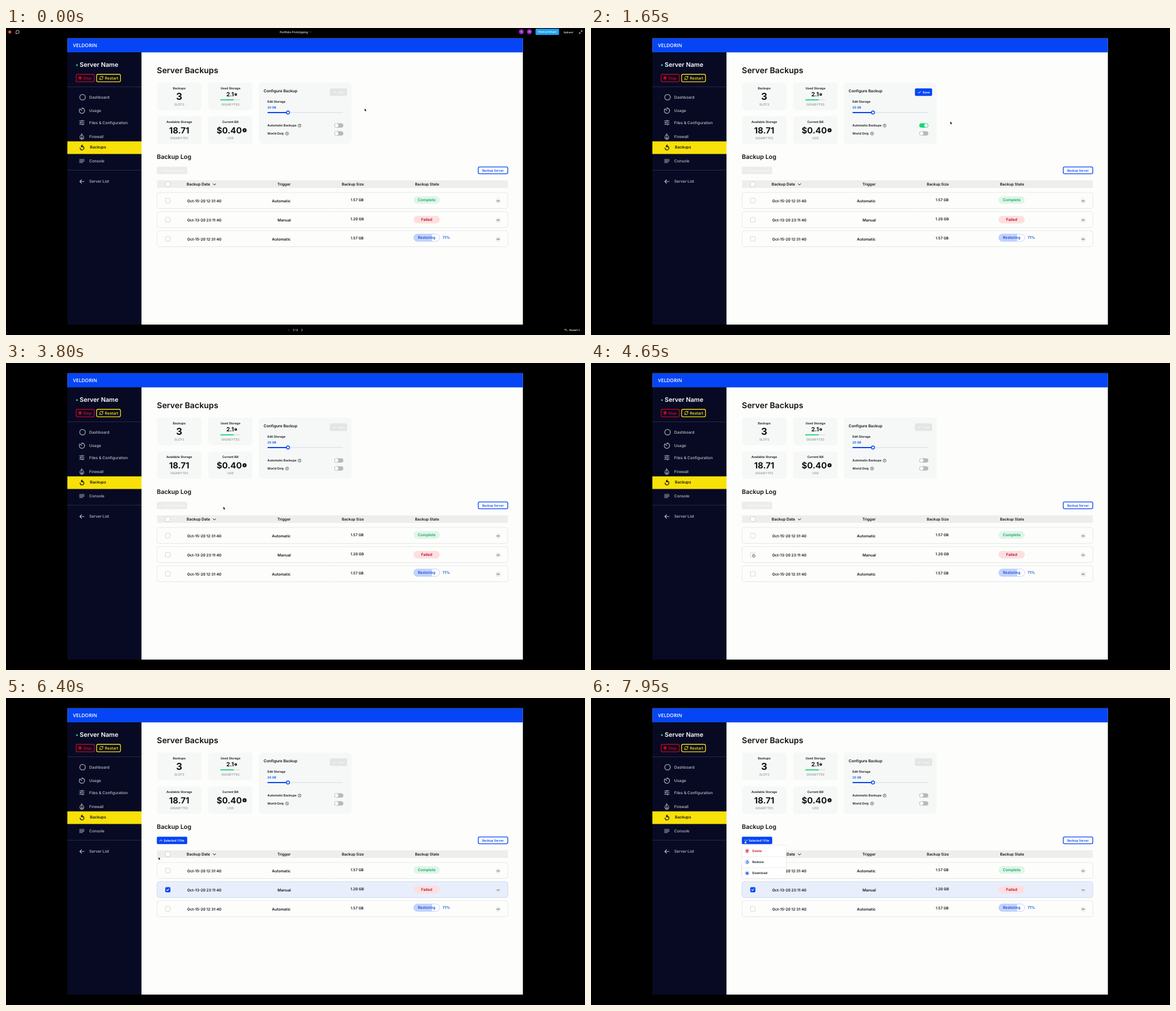
An HTML page with a canvas that plays this animation: 1000x530 px, repeating every 8 s.

```html
<!DOCTYPE html>
<html lang="en">
<head>
<meta charset="utf-8">
<title>Server Backups</title>
<style>
  html, body { margin: 0; width: 100%; height: 100%; overflow: hidden; background: #000; }
  canvas { display: block; width: 1000px; height: 530px; }
</style>
</head>
<body>
<canvas id="stage"></canvas>
<script>
const LOOP = 8000;
const BLUE = '#0545f5', NAVY = '#070a22', YELLOW = '#f8e108', RED = '#cf0a24',
      GREEN = '#1bd475', INK = '#111214', PAGE = '#fdfefc', CARD = '#f5f8f6', GREY = '#9da09e';

const canvas = document.getElementById('stage');
const ctx = canvas.getContext('2d');
const ratio = window.devicePixelRatio || 1;
canvas.width = 1000 * ratio;
canvas.height = 530 * ratio;

// Click times and the pointer route: [ms, x, y]
const TOGGLE_ON = 700, TOGGLE_OFF = 3150, SELECT = 4750, OPEN_MENU = 7300;
const route = [
  [0, 619.5, 139], [100, 619.5, 139], [550, 578.5, 167], [1300, 578.5, 167],
  [1800, 632, 160], [2500, 632, 160], [2950, 578, 167], [3300, 578, 167],
  [3800, 375.5, 248.3], [4500, 280.5, 330.5], [5500, 280.5, 330.5],
  [6400, 263.5, 274.7], [6900, 266, 246.8], [LOOP, 266, 246.8]
];

function text(str, x, y, size, { color = INK, weight = 600, align = 'left', family = 'Inter' } = {}) {
  ctx.font = `${weight} ${size}px ${family}, sans-serif`;
  ctx.textAlign = align;
  ctx.fillStyle = color;
  ctx.fillText(str, x, y);
}

const centered = (str, x, y, size, color = INK, weight = 600) =>
  text(str, x, y, size, { color, weight, align: 'center' });

function rect(x, y, w, h, color) {
  ctx.fillStyle = color;
  ctx.fillRect(x, y, w, h);
}

function box(x, y, w, h, r, fill, stroke, width = 1) {
  ctx.beginPath();
  ctx.roundRect(x, y, w, h, r);
  if (fill) { ctx.fillStyle = fill; ctx.fill(); }
  if (stroke) { ctx.strokeStyle = stroke; ctx.lineWidth = width; ctx.stroke(); }
}

function circle(x, y, r, fill, stroke, width = 1) {
  ctx.beginPath();
  ctx.arc(x, y, r, 0, Math.PI * 2);
  if (fill) { ctx.fillStyle = fill; ctx.fill(); }
  if (stroke) { ctx.strokeStyle = stroke; ctx.lineWidth = width; ctx.stroke(); }
}

function icon(d, x, y, stroke, width = 1, fill) {
  const path = new Path2D(d);
  ctx.save();
  ctx.translate(x, y);
  ctx.lineCap = ctx.lineJoin = 'round';
  if (fill) { ctx.fillStyle = fill; ctx.fill(path); }
  if (stroke) { ctx.strokeStyle = stroke; ctx.lineWidth = width; ctx.stroke(path); }
  ctx.restore();
}

const SHAPES = {
  check: 'M-2 0L-.6 1.5L2-1.5',
  down: 'M-2.3-1.1L0 1.1L2.3-1.1',
  up: 'M-2.1 1L0-1L2.1 1',
  gauge: 'M-3.2-3.2A4.6 4.6 0 1 0 0-4.6V-3M0 0L-2.7-2.6',
  sliders: 'M-4-3H-.5M2-3H4M.7-4.2V-1.8M-4 0H-2M.5 0H4M-1.5-1.2V1.2M-4 3H0M2.5 3H4M1-4.2M1.2 1.8V4.2',
  flame: 'M-.5-5C0-2.5 3.5-1.5 3.5 1.5A3.5 3.5 0 0 1-3.5 1.5C-3.5-.5-2-1-2-2.8C-1-2.2-.5-1.6-.5-.5C.4-1.5.2-3-.5-5M0 4A1.5 1.5 0 0 1 0 1A1.5 1.5 0 0 1 0 4',
  undo: 'M-3 .3A3.3 3.3 0 1 0 0-2.7H-1M.8-4.7L-1.2-2.7L.8-.8',
  lines: 'M-4-2.6H4M-4 0H4M-4 2.6H1.5',
  back: 'M4 0H-3.5M-.5-3L-3.5 0L-.5 3',
  cycle: 'M-2.8-.4A2.8 2.8 0 0 1 2.3-1.6M2.8-3V-1.3H1.2M2.8.4A2.8 2.8 0 0 1-2.3 1.6M-2.8 3V1.3H-1.2',
  trash: 'M-1.8-1.2H1.8M-.7-1.2V-2H.7V-1.2M-1.4-1.2L-1.2 2H1.2L1.4-1.2',
  save: 'M-1.8-.8V1.8H1.8V-.8H-1.8M0-2.2V.8M-.8 .1L0 .8L.8 .1',
  arrow: 'M0 0V4.3L1-.1L1 3.4L1.8 5L2.6 4.6L1.9 3.1H3.2Z',
  pointer: 'M0 0V4.4L1 3.5L1.8 5.1L2.5 4.8L1.8 3.2H3.1Z',
  hand: 'M-.6-1.6Q0-2.3.5-1.6V.1L2.3.5Q3 .8 2.8 1.6L2.3 3.5H-.3L-2 1.3Q-1.7.6-.6 1.4Z'
};

function button(x, y, w, h, fill, stroke) {
  box(x, y, w, h, 2.3, fill, stroke, 1.3);
}

function sidebar() {
  rect(106, 42, 128, 470, NAVY);
  circle(122.5, 64, 1.5, '#20d69a');
  text('Server Name', 127.3, 67.4, 10.6, { color: '#fff' });

  button(121.2, 80, 31.3, 12.8, null, '#b80822');
  rect(125.4, 83.6, 5, 5, '#d4001f');
  text('Stop', 133.3, 88.6, 6.6, { color: RED });
  button(156.5, 80, 41.2, 12.8, null, YELLOW);
  icon(SHAPES.cycle, 164.6, 86.3, YELLOW, 1);
  text('Restart', 170.8, 88.6, 6.6, { color: YELLOW });

  ctx.setLineDash([1.5, 0.7]);
  for (const y of [101.5, 245.5]) {
    ctx.beginPath();
    ctx.moveTo(106, y);
    ctx.lineTo(234, y);
    ctx.strokeStyle = '#363950';
    ctx.lineWidth = 1;
    ctx.stroke();
  }
  ctx.setLineDash([]);

  rect(106, 195.7, 128, 21.8, YELLOW);
  const pale = '#b9bbc5';
  circle(132.2, 119.5, 4.8, null, '#8f929e', 1.5);
  icon(SHAPES.gauge, 131, 142.7, pale, 1.1);
  icon(SHAPES.sliders, 131, 163.3, pale, 1.1);
  icon(SHAPES.flame, 131, 187.3, pale, 1);
  icon(SHAPES.undo, 131, 206.7, INK, 1.3);
  icon(SHAPES.lines, 131, 229.6, pale, 1.1);
  icon(SHAPES.back, 131, 265, pale, 1.1);
  const items = [['Dashboard', 119.5], ['Usage', 142.5], ['Files & Configuration', 163.5],
                 ['Firewall', 187.5], ['Console', 229.5], ['Server List', 265]];
  for (const [label, y] of items) text(label, 143.8, y + 2.4, 6.7, { color: '#c1c3cc', weight: 500 });
  text('Backups', 145, 208.2, 6.7);
}

function card(x, y, title, value, unit, size, valueX) {
  const mid = x + 38.4;
  box(x, y, 76.8, 47.5, 5, CARD);
  centered(title, mid, y + 11.8, 5.25);
  centered(value, valueX, y + (size < 12 ? 24.3 : 29.6), size, INK, 700);
  centered(unit, mid, y + (size < 12 || size > 16 ? 39.5 : 39.9), 5.4, GREY);
}

function info(x, y, r) {
  circle(x, y, r, INK);
  icon('M0-.2V1M0-1.1V-1', x, y, CARD, r * 0.3);
}

function toggle(y, on) {
  box(567, y - 3.8, 15.6, 7.6, 3.8, on ? GREEN : '#b7b9b8');
  circle(on ? 578.7 : 571, y, 3, '#fff');
}

function help(x, y) {
  circle(x, y, 2.6, null, '#333', 0.7);
  centered('?', x, y + 1.5, 4, '#222');
}

function summary(on) {
  text('Server Backups', 260.6, 78, 13.9);
  card(260.8, 94, 'Backups', '3', 'SLOTS', 16.5, 299.2);
  card(349.2, 94, 'Used Storage', '2.1', 'GIGABYTES', 10, 387);
  info(396.8, 114.7, 2.3);
  box(370, 123.2, 34.5, 1.8, 0.9, '#dfe5e2');
  box(370, 123.2, 23.5, 1.8, 0.9, GREEN);
  card(260.8, 152.5, 'Available Storage', '18.71', 'GIGABYTES', 14.6, 299.2);
  card(349.2, 152.5, 'Current Bill', '$0.40', 'USD', 14.6, 385.5);
  info(412, 176.5, 3.5);

  box(437, 94, 160, 106, 6, CARD);
  text('Configure Backup', 445, 110.5, 6.7);
  box(559.5, 104.3, 29.6, 13, 2, on ? BLUE : '#e3e5e4');
  icon(SHAPES.check, 567, 111, '#fff', 1);
  text('Save', 572.5, 113, 5.4, { color: on ? '#fff' : '#f4f5f4' });
  text('Edit Storage', 451.5, 128.5, 5.3);
  text('20 GB', 451.5, 139, 5.2, { color: BLUE });
  box(451.5, 145, 130.5, 1.8, 0.9, '#e0e6f1');
  box(451.5, 144.9, 35.5, 2, 1, BLUE);
  circle(487, 145.9, 2.6, '#fff', BLUE, 1.4);
  text('Automatic Backups', 451.5, 170.3, 5.35);
  help(507, 168.5);
  toggle(168.2, on);
  text('World Only', 451.5, 184, 5.3);
  help(485.4, 182.2);
  toggle(182, false);
}

function checkbox(y, checked) {
  box(275.5, y - 4, 8, 8, 1.3, checked ? BLUE : '#fff', checked ? BLUE : '#cfd1d0', 0.9);
  if (checked) icon(SHAPES.check, 279.5, y, '#fff', 1.1);
}

function pill(y, label, fill, color) {
  box(703.8, y - 6.6, 45.4, 13.2, 6.6, fill);
  centered(label, 726.5, y + 2.4, 6.6, color);
}

function progressPill(y) {
  box(704.3, y - 6.3, 44.6, 12.6, 6.3, '#fff', '#bccdf8', 0.9);
  box(703.8, y - 6.6, 32.2, 13.2, [6.6, 0, 0, 6.6], '#c2d2fb');
  centered('Restoring', 726.5, y + 2.3, 6.5, '#1950dc');
  text('71%', 754, y + 2.4, 6.4, { color: '#1950dc' });
}

function row(top, date, trigger, size, selected) {
  box(260.8, top, 606, 27.6, 4, selected ? '#e8eefb' : PAGE, selected ? '#cbd8f0' : '#e4e6e5', 0.9);
  checkbox(top + 14, selected);
  centered(date, 342.5, top + 16.6, 6.4);
  centered(trigger, trigger === 'Manual' ? 480.5 : 475.5, top + 16.6, 6.5);
  centered(size, 606.5, top + 15.3, 6.3);
  circle(850, top + 14.6, 4.2, '#e5e8e7');
  for (const dx of [-1.6, 0, 1.6]) circle(850 + dx, top + 14.6, 0.6, '#222');
}

function backupLog(selected, menuOpen) {
  text('Backup Log', 260.5, 225.5, 10.5);
  box(260.5, 239.6, 52.5, 12.6, 2, selected ? BLUE : '#ececeb');
  const label = selected ? '#fff' : '#f9f9f8';
  icon(menuOpen ? SHAPES.down : SHAPES.up, 267.5, 246, label, 1);
  text(selected ? 'Selected 1 File' : 'None Selected', 272.2, 247.9, 5.2, { color: label });
  button(815.6, 239.8, 51, 11.8, '#fff', BLUE);
  centered('Backup Server', 841, 247.9, 5.25, BLUE);

  rect(260.8, 263, 606, 13, '#eeeeed');
  checkbox(269.6, false);
  text('Backup Date', 312, 272.2, 6.65);
  icon(SHAPES.down, 360, 270, INK, 1);
  centered('Trigger', 480.2, 272.2, 6.5);
  centered('Backup Size', 599, 272.2, 6.45);
  centered('Backup State', 727.3, 272.2, 6.5);

  row(284, 'Oct-15-20 12:31:40', 'Automatic', '1.57 GB', false);
  row(317, 'Oct-13-20 23:11:40', 'Manual', '1.20 GB', selected);
  row(350, 'Oct-15-20 12:31:40', 'Automatic', '1.57 GB', false);
  pill(296.8, 'Complete', '#e0f5e9', '#18a95c');
  pill(330.8, 'Failed', '#fddfe2', '#b60c20');
  progressPill(362);
}

function menu() {
  ctx.save();
  ctx.shadowColor = 'rgba(0,0,0,.2)';
  ctx.shadowBlur = 2 * ratio;
  box(261, 254.6, 76, 56.9, 1.5, '#fff');
  ctx.restore();
  const items = [['Delete', 'trash', '#fbdfe3', RED], ['Restore', 'undo', '#dfe8fd', BLUE],
                 ['Download', 'save', '#dfe8fd', BLUE]];
  items.forEach(([label, shape, tint, color], i) => {
    const y = 264.2 + i * 19.1;
    if (i) rect(261, y - 9.8, 76, 0.8, '#e6e7e7');
    circle(269.7, y, 4.7, tint);
    ctx.save();
    ctx.translate(269.7, y);
    if (shape === 'undo') ctx.scale(0.6, 0.6);
    icon(SHAPES[shape], 0, 0, color, shape === 'undo' ? 1.5 : 0.9);
    ctx.restore();
    text(label, 278.5, y + 2, 5.4, { color: i ? INK : RED });
  });
}

function viewerBars(alpha) {
  if (alpha <= 0) return;
  ctx.save();
  ctx.globalAlpha = alpha;
  const white = '#f4f4f4';
  circle(6.6, 6.8, 2.6, '#f24e1e');
  icon('M-2.8 2.8V0A2.8 2.8 0 1 1 0 2.8Z', 20, 6.8, white, 0.8);
  centered('Portfolio Prototyping', 497, 8.8, 4.95, white, 500);
  icon('M-1-.5L0 .5L1-.5', 525.5, 7, '#999', 0.6);
  for (const [x, letter] of [[890, 'G'], [904, 'H']]) {
    circle(x, 6.4, 4.3, '#9222b8');
    centered(letter, x, 8, 4.2, '#fff', 500);
  }
  box(914.6, 1.3, 40.6, 10.8, 1.5, '#24a1ee');
  centered('Share prototype', 935, 8.3, 4.1, '#fff');
  text('Options', 963, 8.5, 4.2, { color: white });
  icon('M-1-.5L0 .5L1-.5', 979.5, 7, '#aaa', 0.6);
  icon('M.4-.4L2.4-2.4M.8-2.4H2.4V-.8M-.4.4L-2.4 2.4M-2.4.8V2.4H-.8', 992.5, 7, white, 0.7);
  icon('M.9-1.8L-.9 0L.9 1.8', 488.4, 521.5, '#666', 0.7);
  centered('1 / 2', 499.7, 523.1, 4.6, white);
  icon('M-.9-1.8L.9 0L-.9 1.8', 511.2, 521.5, white, 0.8);
  icon('M-.6-1.8L-1.8-.8L-.6.2M-1.8-.8H1Q2-.8 2 1.4', 966.8, 521.5, white, 0.7);
  text('Restart', 973, 523, 4.2, { color: white });
  centered('R', 989.8, 523, 4, '#aaa');
  ctx.restore();
}

function pointerAt(t) {
  const i = route.findIndex(([time]) => time > t);
  const [t0, x0, y0] = route[i - 1], [t1, x1, y1] = route[i];
  const p = (t - t0) / (t1 - t0), ease = p * p * (3 - 2 * p);
  return [x0 + (x1 - x0) * ease, y0 + (y1 - y0) * ease];
}

function pointer(t, selected) {
  const [x, y] = pointerAt(t);
  const inside = (l, top, r, b) => x > l && x < r && y > top && y < b;
  const overControl = inside(567, 164, 583, 172) || inside(275, 327, 284, 335) ||
                      (selected && inside(260, 239, 313, 252));
  if (overControl) icon(SHAPES.hand, x, y + 1, '#222', 0.6, '#fff');
  else icon(SHAPES.pointer, x, y, '#fff', 0.9), icon(SHAPES.pointer, x, y, null, 0, '#000');
}

function draw(t) {
  const on = t >= TOGGLE_ON && t < TOGGLE_OFF;
  const selected = t >= SELECT, menuOpen = t >= OPEN_MENU;
  ctx.setTransform(ratio, 0, 0, ratio, 0, 0);
  ctx.textRendering = 'geometricPrecision';
  rect(0, 0, 1000, 530, '#000');
  rect(106.3, 17.8, 786.4, 494.2, PAGE);
  rect(106.3, 17.8, 786.4, 24.3, BLUE);
  text('VELDORIN', 115.8, 33.3, 8.4, { color: '#fff', family: '"Open Sans"' });
  sidebar();
  summary(on);
  backupLog(selected, menuOpen);
  if (menuOpen) menu();
  viewerBars(Math.min(1, 1 - (t - 150) / 300));
  pointer(t, selected);
}

function tick() {
  draw(performance.now() % LOOP);
  requestAnimationFrame(tick);
}
tick();
</script>
</body>
</html>
```
